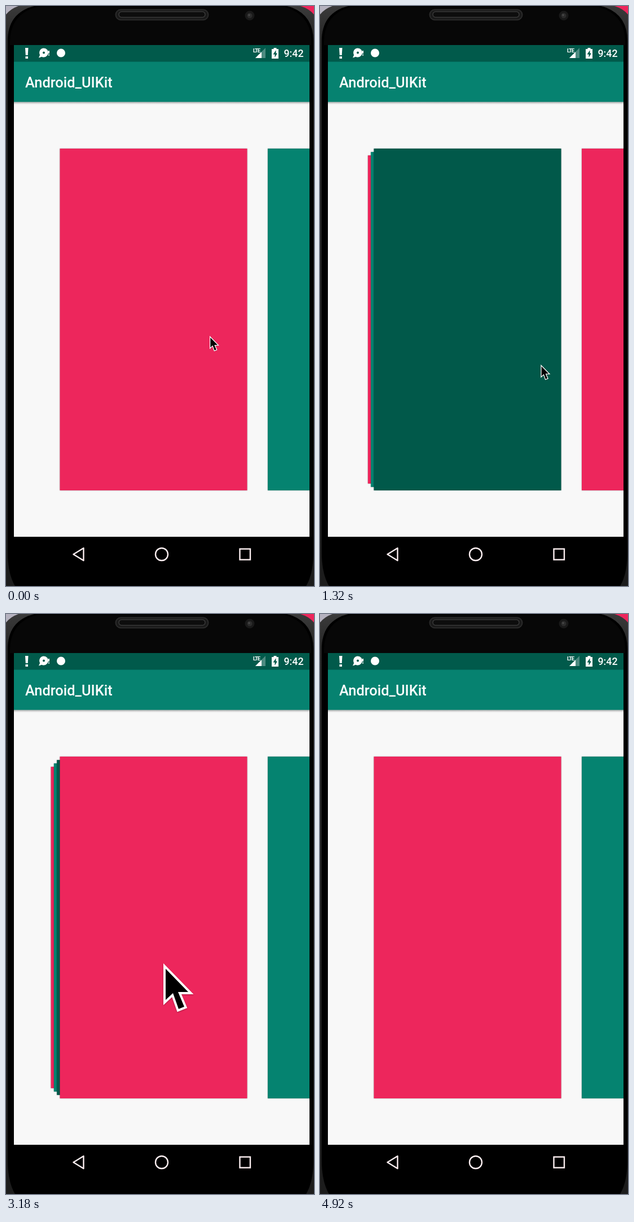
An HTML page for the animation above (5.28 s loop, 546x1025 px).

```html
<!DOCTYPE html>
<html lang="en">
<head>
<meta charset="utf-8">
<title>Card stack</title>
<style>
  html, body { margin: 0; width: 100%; height: 100%; overflow: hidden; background: #000; }
  svg { display: block; width: 546px; height: 1025px; }
  text { font-family: Roboto, sans-serif; font-weight: 500; fill: #fff; }
  .card { filter: drop-shadow(0 .5px 1.2px rgba(0, 0, 0, .35)); }
  .nav { fill: none; stroke: #fbeef0; stroke-width: 2.4; }
  #cursor { filter: drop-shadow(0 1px 1px rgba(0, 0, 0, .3)); }
</style>
</head>
<body>
<svg viewBox="0 0 546 1025">
  <defs>
    <clipPath id="screen"><rect x="14" y="69" width="524" height="869"/></clipPath>
    <linearGradient id="fade" x2="0" y2="1">
      <stop offset="0" stop-color="#000" stop-opacity=".32"/>
      <stop offset="1" stop-color="#000" stop-opacity="0"/>
    </linearGradient>
    <linearGradient id="rim" x2="0" y2="1">
      <stop offset="0" stop-color="#3a3a3a"/>
      <stop offset=".06" stop-color="#262626"/>
      <stop offset="1" stop-color="#1c1c1c"/>
    </linearGradient>
  </defs>

  <!-- phone body -->
  <rect width="40" height="40" fill="#b5b2bf"/>
  <rect x="506" width="40" height="40" fill="#ed265c"/>
  <path d="M0 15Q8 5 22 0H522Q538 5 546 15V1025H0Z" fill="url(#rim)"/>
  <path d="M3 62Q3 12 50 0H498Q545 12 545 62V965Q545 1003 532 1025H16Q3 1003 3 965Z" fill="#000"/>
  <path d="M7 62Q8 14 54 2H494Q540 14 541 62V69H7Z" fill="#070707"/>
  <rect x="194.5" y="6.5" width="164" height="18" rx="9" fill="#191919" stroke="#2b2b2b" stroke-width="2"/>
  <rect x="200" y="10" width="153" height="10" rx="5" fill="#0d0d0d" stroke="#383838" stroke-width="1.5"/>
  <circle cx="432" cy="17" r="8.5" fill="#191919"/>
  <circle cx="432" cy="17" r="4.5" fill="#2c2c2c"/>
  <circle cx="431" cy="16" r="1.8" fill="#484848"/>

  <!-- screen -->
  <g clip-path="url(#screen)">
    <rect x="14" y="69" width="524" height="869" fill="#f8f8f8"/>
    <g id="cards"></g>
    <rect x="14" y="169" width="524" height="5" fill="url(#fade)"/>
    <rect x="14" y="98" width="524" height="71.5" fill="#068270"/>
    <rect x="14" y="69" width="524" height="29.5" fill="#015a4b"/>
  </g>
  <text x="34" y="144" font-size="25.4">Android_UIKit</text>

  <!-- status bar -->
  <g fill="#fff">
    <path d="M34 74H39.5L38.7 87H34.8Z"/>
    <rect x="34.5" y="89" width="4.5" height="4"/>
    <path d="M67 74.5a8 8 0 1 1-3.5 15.2L58 91.5 60.2 86.5A8 8 0 0 1 67 74.5Z"/>
    <circle cx="67" cy="82.5" r="2" fill="#015a4b"/>
    <path d="M75 79h2v5h-2zM75 85.5h2v2h-2z"/>
    <circle cx="97.5" cy="83" r="7.5"/>
    <path d="M460 74V92H442Z" opacity=".3"/>
    <path d="M453 81V92H442Z"/>
    <path d="M474.5 76V74H479.5V76H483V93H471V76Z"/>
    <path d="M478.5 78L473.5 85.5H476.5V91L481 83.5H478.5Z" fill="#015a4b"/>
  </g>
  <text x="438" y="82" font-size="9.5" letter-spacing="-1.1" style="font-weight:700">LTE</text>
  <text x="527.5" y="90" font-size="17.8" text-anchor="end">9:42</text>

  <!-- navigation bar -->
  <path class="nav" d="M119.5 969L137.5 958V980Z" stroke-linejoin="round"/>
  <circle class="nav" cx="276" cy="969" r="11"/>
  <rect class="nav" x="414.5" y="959.5" width="18.5" height="19"/>

  <g id="cursor">
    <path d="M4 9V64L17 52 27 80 37 76 26 50H44Z" stroke="#fff" stroke-width="8"
          stroke-miterlimit="6" paint-order="stroke"/>
  </g>
</svg>
<script>
  const LOOP = 5280, STEP = 60;
  const COLORS = ['#ed265c', '#058370', '#01594a'];

  // [time, page]
  const PAGE = [
    [0, 0], [60, 0], [240, .4], [360, .8], [520, 1], [740, 1], [900, 1.3365], [1020, 1.75],
    [1180, 2], [1360, 2], [1500, 2.45], [1600, 2.88], [1680, 2.976], [1740, 3], [2220, 3],
    [2400, 3.385], [2500, 3.75], [2580, 3.95], [2640, 3.95], [2760, 3.75], [2880, 3.25],
    [3000, 3], [3240, 3], [3300, 2.86], [3400, 2.45], [3540, 2], [3620, 2], [3760, 1.5],
    [3880, 1.06], [3940, 1], [4000, 1], [4140, .7], [4260, .25], [4400, .03], [4460, 0]
  ];
  // [time, x, y]
  const POINTER = [
    [0, 361, 583], [60, 361, 585], [240, 225, 615], [360, 205, 622], [480, 230, 625],
    [740, 417, 622], [900, 292, 618], [1000, 240, 622], [1100, 250, 628], [1360, 400, 634],
    [1560, 255, 632], [1680, 245, 632], [2160, 370, 628], [2220, 370, 628], [2400, 227, 626],
    [2540, 140, 626], [2640, 150, 626], [2820, 300, 624], [2920, 200, 620], [3000, 300, 619],
    [3080, 230, 618], [3180, 279, 618], [3240, 200, 620], [3400, 330, 622], [3500, 350, 623],
    [3620, 200, 624], [3760, 300, 626], [3880, 330, 627], [3960, 315, 628], [4020, 250, 630],
    [4200, 390, 650], [4380, 430, 860], [4500, 450, 1035]
  ];
  const ZOOM = [[2960, .32], [3060, 1], [3210, 1], [3360, .32]];

  // Monotone cubic through the keys: no overshoot, flat at turning points.
  function track(keys, t, col = 1) {
    const last = keys.length - 1;
    if (t <= keys[0][0]) return keys[0][col];
    if (t >= keys[last][0]) return keys[last][col];
    const i = keys.findIndex(k => k[0] > t) - 1;
    const rise = j => j < 0 || j >= last ? 0
      : (keys[j + 1][col] - keys[j][col]) / (keys[j + 1][0] - keys[j][0]);
    const slope = j => {
      const a = rise(j - 1), b = rise(j);
      return a * b <= 0 ? 0 : 2 * a * b / (a + b);
    };
    const a = keys[i], b = keys[i + 1], span = b[0] - a[0], u = (t - a[0]) / span;
    const ease = u * u * (3 - 2 * u);
    return a[col] + (b[col] - a[col]) * ease
      + span * u * (1 - u) * (slope(i) * (1 - u) - slope(i + 1) * u);
  }

  const set = (el, attrs) => {
    for (const name in attrs) el.setAttribute(name, attrs[name]);
  };
  const cursor = document.getElementById('cursor');
  const cards = Array.from({ length: 6 }, (_, i) => {
    const card = document.createElementNS('http://www.w3.org/2000/svg', 'rect');
    set(card, { class: 'card', fill: COLORS[i % 3] });
    return document.getElementById('cards').appendChild(card);
  });

  function draw(now) {
    const t = Math.floor((now % LOOP) / STEP) * STEP;
    const page = track(PAGE, t);
    cards.forEach((card, i) => {
      const d = i - page;
      const depth = Math.max(0, -d);
      set(card, {
        x: 95.5 + d * (d > 0 ? 368.5 : 5.3),
        y: 252 + 6 * depth,
        width: 332 * (1 - .02 * depth),
        height: 604 - 12 * depth
      });
    });
    const x = track(POINTER, t, 1), y = track(POINTER, t, 2);
    set(cursor, { transform: `translate(${x} ${y}) scale(${track(ZOOM, t)})` });
    requestAnimationFrame(draw);
  }
  draw(0);
</script>
</body>
</html>
```
